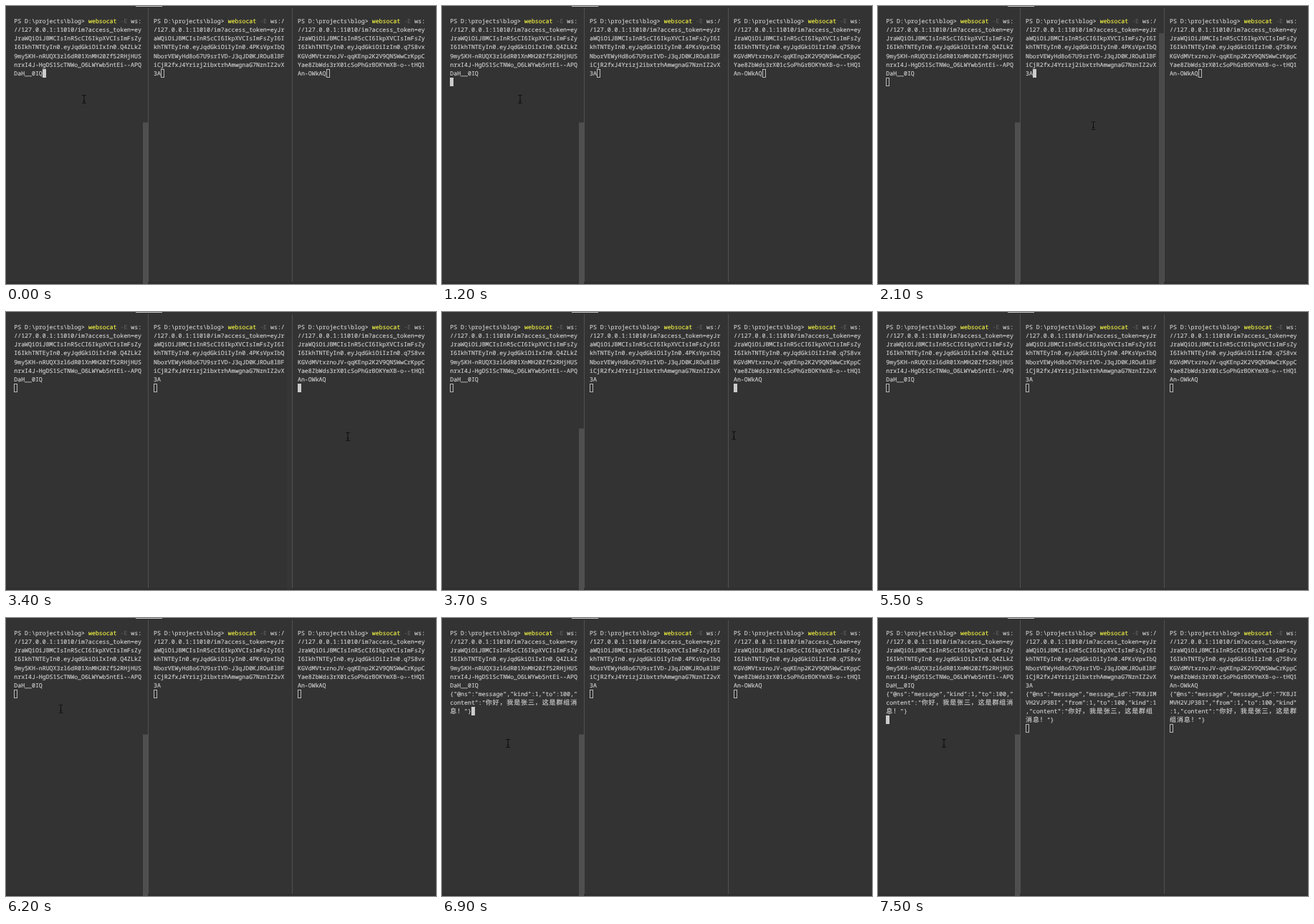
Write an HTML page that moves like this. It is 600 px wide and 388 px high and loops after 8000 ms.

```html
<!DOCTYPE html>
<html lang="en">
<head>
<meta charset="utf-8">
<title>Three terminals</title>
<style>
  html, body { margin: 0; width: 100%; height: 100%; overflow: hidden; background: #333334; }
  svg { display: block; width: 100vw; height: 100vh; }
  text {
    font: 500 8.23px "Noto Sans Mono", "DejaVu Sans Mono", monospace;
    fill: #d0d0d0;
    stroke: #d0d0d0;
    stroke-width: 0.15px;
    white-space: pre;
    text-rendering: geometricPrecision;
  }
  .wide {
    font: 9px "Noto Sans CJK SC", "Noto Sans CJK", "Noto Sans CJK JP", sans-serif;
    letter-spacing: 0.88px;
  }
  .command { fill: #f5f543; stroke: #f5f543; }
  .flag { fill: #666666; stroke: none; }
</style>
</head>
<body>
<svg id="stage" viewBox="0 0 600 388"></svg>
<script>
const LOOP = 8000, STEP = 100, GLIDE = 400;
const CELL = 4.94, ROW = 12.1, TOP = 15.2;
const stage = document.getElementById("stage");

function setAttrs(el, attrs) {
  for (const key in attrs) el.setAttribute(key, attrs[key]);
  return el;
}

function add(name, attrs, parent = stage) {
  const el = document.createElementNS("http://www.w3.org/2000/svg", name);
  return parent.appendChild(setAttrs(el, attrs));
}

const rect = (x, y, width, height, fill) => add("rect", { x, y, width, height, fill });
const isWide = ch => ch.charCodeAt(0) > 0x2e80;
const cells = str => [...str].reduce((n, ch) => n + (isWide(ch) ? 2 : 1), 0);

// Break text at the pane width, counting wide characters as two cells.
function wrap(str, cols) {
  const lines = [""];
  for (const ch of str) {
    if (cells(lines.at(-1) + ch) > cols) lines.push("");
    lines[lines.length - 1] += ch;
  }
  return lines;
}

// Draw runs one after another on a row, each starting on its own cell.
function drawRow(group, pane, row, runs) {
  let cell = 0;
  for (const [str, type = ""] of runs) {
    const el = add("text", {
      x: pane.x + cell * CELL,
      y: TOP + row * ROW + 8.9,
      class: isWide(str) ? "wide" : type
    }, group);
    el.textContent = str;
    cell += cells(str);
  }
}

function drawLines(pane, lines, firstRow) {
  const group = add("g", {});
  lines.forEach((line, i) => {
    const runs = line.match(/[\u2e80-\uffff]+|[^\u2e80-\uffff]+/g);
    drawRow(group, pane, firstRow + i, runs.map(run => [run]));
  });
  return group;
}

const PROMPT = "PS D:\\projects\\blog> ";
const COMMAND = "websocat";
const FLAG = " -E ";
const URL_HEAD = "ws://127.0.0.1:11010/im?access_token=" +
  "eyJraWQiOiJBMCIsInR5cCI6IkpXVCIsImFsZyI6IkhTNTEyIn0.eyJqdGkiOiI";
const BODY = '"content":"你好，我是张三，这是群组消息！"}';
const SENT = '{"@ns":"message","kind":1,"to":100,' + BODY;
const RECEIVED = '{"@ns":"message","message_id":"7KBJIMVH2VJP3BI",' +
  '"from":1,"to":100,"kind":1,' + BODY;
const PASTE = 6700, SEND = 7500;

const panes = [
  { x: 11.3, cols: 36, enter: 1200, show: PASTE, message: SENT,
    focused: t => t < 1900 || (t >= 4000 && t < 5100) || t >= 6500,
    token: "xIn0.Q4ZLkZ9my5KH-nRUQX3zl6dR01XnMH20Zf52RHjHUSnrxI4J-HgDS1ScTNWo_O6LWYwb5ntEi--APQDaH__0IQ" },
  { x: 206, cols: 37, enter: 2300, show: SEND, message: RECEIVED,
    focused: t => t >= 1900 && t < 2700,
    token: "yIn0.4PKsVpxIbQNborVEWyHd8o67U9srIVD-J3qJD0KJROu8lBFiCjR2fxJ4Yrizj2ibxtrhAmwgnaG7NznIZ2vX3A" },
  { x: 407, cols: 36, enter: 3100, show: SEND, message: RECEIVED,
    focused: t => t >= 2700 && t < 4000,
    token: "zIn0.q7S8vxKGVdMVtxznoJV-qqKEnp2K2V9QN5WwCrKppCYae8ZbWds3rX01cSoPhGrBOKYmXB-o--tHQ1An-OWkAQ" }
];

// Window chrome
rect(181, 0, 37, 1, "#c4c4c4");
rect(0, 385, 600, 3, "#2f2f30");
rect(198, 3, 1, 382, "#515152");
rect(399, 3, 1, 382, "#515152");
const leftThumb = rect(191, 162.5, 7, 226, "#4f4f50");
const middleThumb = rect(392, 38, 7, 350, "#4a4a4b");

for (const pane of panes) {
  const lines = wrap(PROMPT + COMMAND + FLAG + URL_HEAD + pane.token, pane.cols);
  const rest = lines[0].slice((PROMPT + COMMAND + FLAG).length);
  drawRow(stage, pane, 0, [[PROMPT], [COMMAND, "command"], [FLAG, "flag"], [rest]]);
  drawLines(pane, lines.slice(1), 1);

  const reply = wrap(pane.message, pane.cols);
  const end = lines.length + reply.length;
  pane.reply = drawLines(pane, reply, lines.length);
  pane.typed = [cells(lines.at(-1)), lines.length - 1];
  pane.ready = [0, lines.length];
  pane.pasted = [cells(reply.at(-1)), end - 1];
  pane.finished = [0, end];
  pane.cursor = add("rect", { width: 4, height: 11 });
}

const pointer = add("path", {
  d: "M-2.7-5.5H-1Q0-5.5 0-4.5Q0-5.5 1-5.5H2.7M0-4.5V4.5M-2.7 5.5H-1Q0 5.5 0 4.5Q0 5.5 1 5.5H2.7M-1.3 2.5H1.3",
  fill: "none", stroke: "#0c0c0c"
});

// The pointer rests at each stop and glides so as to arrive at the given time.
const stops = [
  { at: 0, x: 109, y: 130 },
  { at: 2100, x: 300.5, y: 167 },
  { at: 2700, x: 526, y: 145 },
  { at: 3300, x: 477, y: 174 },
  { at: 4000, x: 30.5, y: 164 },
  { at: 6200, x: 76.5, y: 127 },
  { at: 6900, x: 92, y: 175 }
];

const ramp = (t, from, to) => Math.min(1, Math.max(0, (t - from) / (to - from)));
const ease = p => p * p * (3 - 2 * p);

function pointerAt(t) {
  let { x, y } = stops[0];
  for (const stop of stops.slice(1)) {
    const p = ease(ramp(t, stop.at - GLIDE, stop.at));
    x += (stop.x - x) * p;
    y += (stop.y - y) * p;
  }
  return [x, y];
}

function placeCursor(pane, t) {
  const [cell, row] = t < pane.enter ? pane.typed
    : t < pane.show ? pane.ready
    : t < SEND ? pane.pasted : pane.finished;
  const focused = pane.focused(t);
  setAttrs(pane.cursor, {
    x: Math.round(pane.x + cell * CELL) + .5,
    y: Math.round(TOP + row * ROW) + .5,
    fill: focused ? "#cccccc" : "none",
    stroke: focused ? "#cccccc" : "#b8b8b8"
  });
}

function render(time) {
  const t = Math.floor((time % LOOP) / STEP) * STEP;
  for (const pane of panes) {
    pane.reply.style.display = t >= pane.show ? "" : "none";
    placeCursor(pane, t);
  }
  leftThumb.setAttribute("opacity", 1 - ramp(t, 2900, 3400) + ramp(t, 3600, 3700)
    - ramp(t, 5400, 5500) + ramp(t, 6100, 6200));
  middleThumb.setAttribute("opacity", ramp(t, 1700, 1800) - ramp(t, 2900, 3500));
  pointer.setAttribute("transform", `translate(${pointerAt(t)})`);
  pointer.style.display = t >= 4300 && t < 6200 ? "none" : "";
}

const start = performance.now();
function tick() {
  render(performance.now() - start);
  requestAnimationFrame(tick);
}
tick();
</script>
</body>
</html>
```
